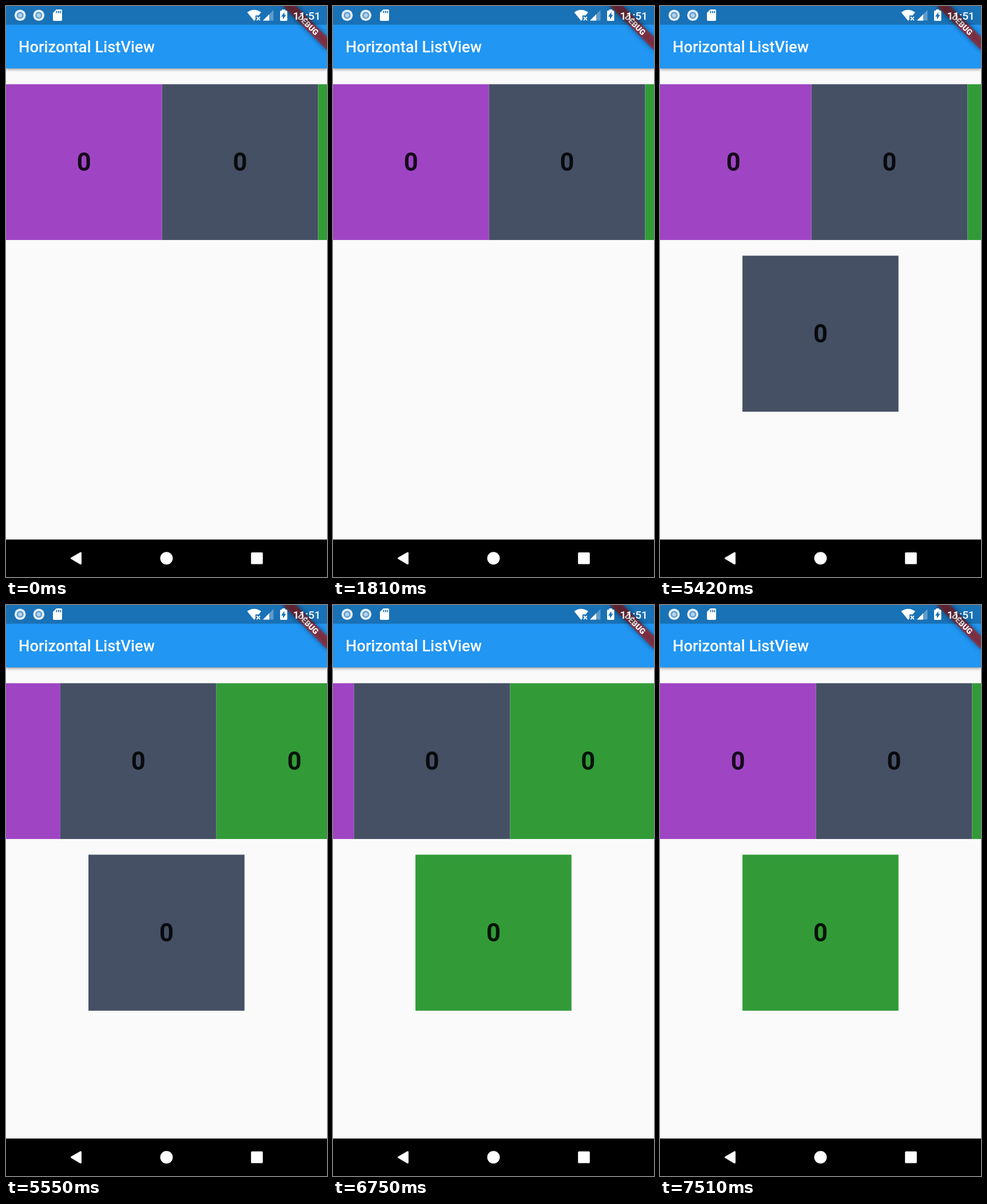
Animation of 561 by 998 pixels, one loop 8000 ms. Source, as an HTML page:

```html
<!DOCTYPE html>
<html lang="en">
<head>
<meta charset="utf-8">
<title>Horizontal ListView</title>
<style>
  html, body { margin: 0; width: 100%; height: 100%; overflow: hidden; background: #fafafa; }
  svg { display: block; width: 100%; height: 100%; }
  text { font-family: Roboto, "Open Sans", sans-serif; font-weight: 500; fill: #fff; }
  .digit { font-size: 43.6px; font-weight: 700; fill: #000; fill-opacity: .87; text-anchor: middle; }
  .bar { filter: drop-shadow(0 2.5px 2.5px rgba(0, 0, 0, .4)); }
</style>
</head>
<body>
<svg viewBox="0 0 561 998">
  <defs>
    <filter id="blur" x="-20%" y="-100%" width="140%" height="300%"><feGaussianBlur stdDeviation="4.5"/></filter>
    <clipPath id="glowClip"><rect width="54.8" height="272.7"/></clipPath>
    <clipPath id="listClip"><rect y="136.4" width="561" height="272.7"/></clipPath>
    <g id="ring">
      <circle r="9.8" fill="#e6f0f8"/>
      <circle r="6" fill="#5a9bd0"/>
      <circle r="3.6" fill="#b4d2ea"/>
    </g>
  </defs>

  <rect width="561" height="998" fill="#fafafa"/>
  <rect class="bar" width="561" height="109" fill="#2196f3"/>
  <text x="22" y="81" font-size="27.3">Horizontal ListView</text>

  <g clip-path="url(#listClip)">
    <g id="list"></g>
    <g transform="translate(0 136.4)">
      <g id="glow" fill="#2196f3" opacity="0">
        <circle cx="-354.3" cy="136.4" r="409.1" clip-path="url(#glowClip)"/>
      </g>
    </g>
  </g>
  <g id="picked"></g>

  <g transform="translate(561 0) rotate(45)">
    <rect x="-54.5" y="38.2" width="109" height="16.4" opacity=".5" filter="url(#blur)"/>
    <rect x="-54.5" y="38.2" width="109" height="16.4" fill="#b71c1c" fill-opacity=".63"/>
    <text y="51.3" font-size="13.9" style="font-weight:900" text-anchor="middle">DEBUG</text>
  </g>

  <rect width="561" height="32.7" fill-opacity=".25"/>
  <use href="#ring" x="24.7" y="16.3"/>
  <use href="#ring" x="57.3" y="16.3"/>
  <path d="M88 6H96Q98 6 98 8V24Q98 26 96 26H84Q82 26 82 24V12Z" fill="#fff"/>
  <path d="M88.5 8.5v4M92 8.5v4M95.3 8.5v4" stroke="#1971b6" stroke-width="1.8"/>
  <path d="M421.5 11Q433.500 2.500 446 11L441.500 16.500H436V23.500L433.700 26Z" fill="#fff"/>
  <path d="M438 19l6 6m0-6l-6 6" stroke="#fff" stroke-width="1.8"/>
  <path d="M449 25.500L467.500 7V25.500Z" fill="#fff" fill-opacity=".3"/>
  <path d="M449 25.500L460 14.500V25.500Z" fill="#fff"/>
  <path d="M482.500 8V6H488V8H490Q491.500 8 491.500 9.500V24.500Q491.500 26 490 26H480.500Q479 26 479 24.500V9.500Q479 8 480.500 8Z" fill="#fff"/>
  <path d="M486.500 10.500V15.500H489.500L484 23.500V18.500H481Z" fill="#1971b6"/>
  <text x="501.500" y="23.500" font-size="19.1">11:51</text>

  <rect y="932.500" width="561" height="66"/>
  <g fill="#fff" stroke="#fff" stroke-width="3" stroke-linejoin="round">
    <path d="M114.500 965.300L130.500 956V974.600Z"/>
    <circle cx="280.500" cy="965.300" r="9.500"/>
    <rect x="429.700" y="956.500" width="17.600" height="17.600"/>
  </g>
</svg>
<script>
const LOOP = 8000, SIZE = 272.7, REST = 244.2;
const COLORS = ["#9f45c4", "#455065", "#329b38"];
const $ = id => document.getElementById(id);
const list = $("list"), picked = $("picked"), glow = $("glow");

const card = (x, y, color) =>
  `<g transform="translate(${x} ${y})"><rect width="${SIZE}" height="${SIZE}" fill="${color}"/>` +
  `<text class="digit" x="${SIZE / 2}" y="151.700">0</text></g>`;

list.innerHTML = COLORS.map((c, i) => card(i * SIZE, 136.4, c)).join("");
picked.innerHTML = card(144.1, 436.4, COLORS[0]);
const pickedRect = picked.querySelector("rect");

// The screen refreshes at a fixed pace while it scrolls.
const snap = (ms, step) => Math.floor(ms / step) * step;

function lerp(keys, t) {
  const i = keys.findIndex(k => k[0] > t);
  if (i < 0) return keys[keys.length - 1][1];
  if (i === 0) return keys[0][1];
  const [t0, a] = keys[i - 1], [t1, b] = keys[i];
  return a + (b - a) * (t - t0) / (t1 - t0);
}

// Drag left, then a fling that slows to rest.
function swipeLeft(ms) {
  if (ms < 130) return lerp([[0, 8], [43, 60], [87, 122], [130, 177.8]], ms);
  const left = 1 - Math.min((ms - 130) / 370, 1);
  return REST - (REST - 177.8) * left ** 3.5;
}

// Drag right until the list hits its start.
const swipeRight = ms => lerp([[0, 236], [45, 166], [90, 82], [130, 0]], ms);

function offset(t) {
  if (t < 5420) return 0;
  if (t < 6750) return swipeLeft(snap(t - 5420, 130 / 3 - .001));
  return swipeRight(snap(t - 6750, 45));
}

function drawGlow(t) {
  const ms = t < 6750 ? -1 : snap(t - 6750, 45) - 130;
  const fade = 1 - Math.min(Math.max((ms - 26) / 600, 0), 1);
  const size = ms < 0 ? 0 : Math.min(ms / 26, 1) * fade ** 2;
  glow.setAttribute("opacity", .3 * size);
  glow.setAttribute("transform", `scale(${size} 1)`);
}

function draw(t) {
  list.setAttribute("transform", `translate(${-offset(t)} 0)`);
  picked.setAttribute("visibility", t < 4700 ? "hidden" : "visible");
  pickedRect.setAttribute("fill", COLORS[t < 5420 ? 0 : t < 6750 ? 1 : 2]);
  drawGlow(t);
}

const start = performance.now();
function tick(now) {
  draw(Math.max(now - start, 0) % LOOP);
  requestAnimationFrame(tick);
}
draw(0);
requestAnimationFrame(tick);
</script>
</body>
</html>
```
